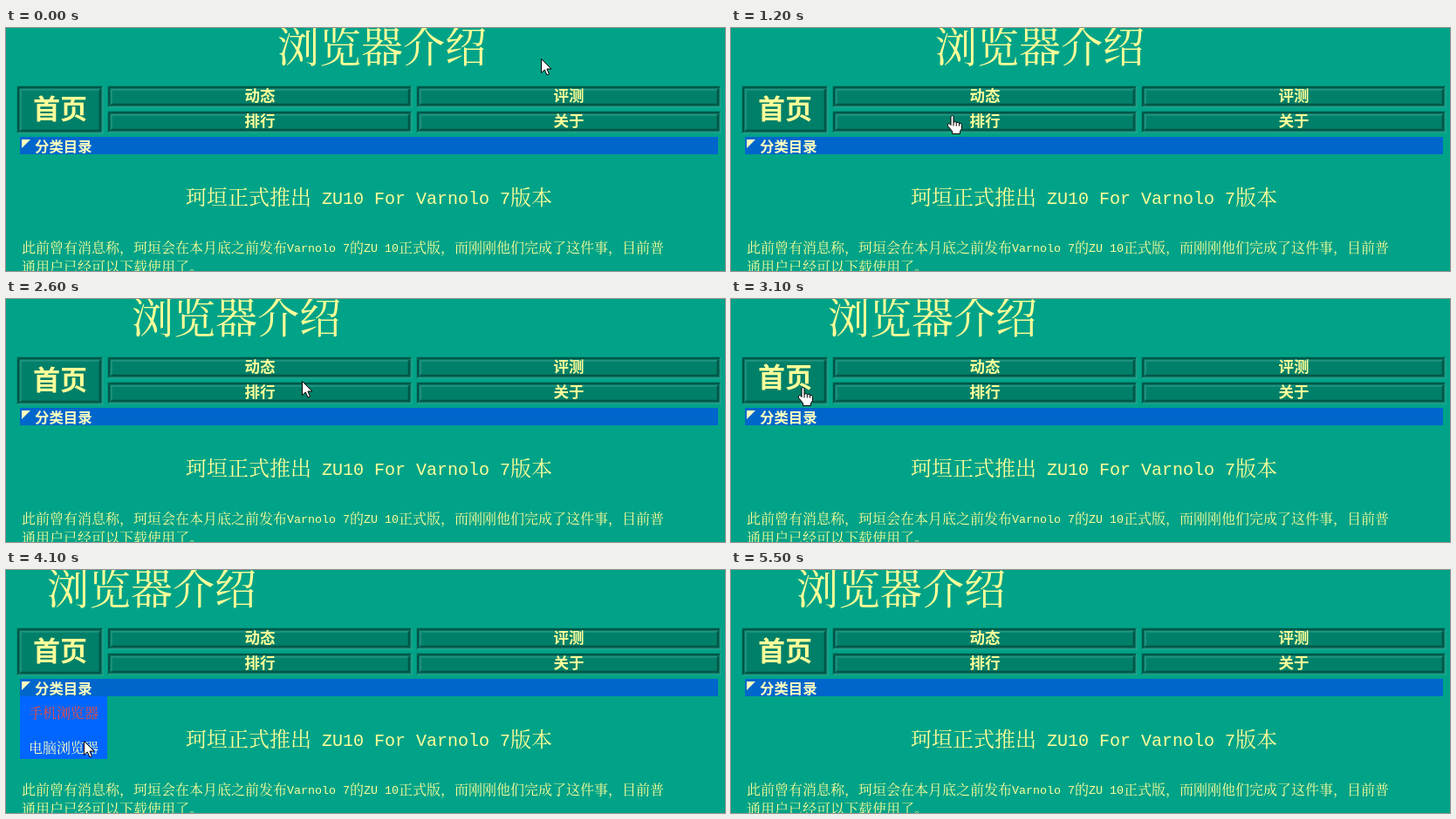
An HTML page with a canvas for the animation above (5600 ms loop, 824x279 px).

```html
<!DOCTYPE html>
<html lang="zh">
<head>
<meta charset="utf-8">
<title>浏览器介绍</title>
<style>
html, body { margin: 0; width: 100%; height: 100%; overflow: hidden; background: #00a388; }
canvas { display: block; }
</style>
</head>
<body>
<canvas id="stage" width="824" height="279"></canvas>
<script>
const ctx = document.getElementById('stage').getContext('2d');
const LOOP = 5600, STEP = 100;
const YELLOW = '#ffff99', PALE = '#ffffc0';
const SANS = '"Noto Sans CJK SC", "Noto Sans CJK", sans-serif';
const SERIF = '"Noto Serif CJK SC", "Noto Sans CJK SC", "Noto Sans CJK", serif';
const MONO = '"Liberation Mono", monospace';

const home = { x: 13, y: 67, w: 98, h: 54, label: '首页', size: 31, lift: 3 };
const links = ['动态', '评测', '排行', '关于'].map((label, i) => ({
  x: 117 + 354 * (i % 2), y: 67 + 29 * Math.floor(i / 2),
  w: 348, h: 24, label, size: 17.5, lift: 0
}));
const buttons = [home, ...links];

// Places the pointer visits: step, x, y
const stops = [
  [0, 613, 35], [6, 228, 60], [12, 253, 100], [18, 592, 107], [21, 595, 86], [31, 82, 101],
  [36, 70, 165], [41, 89, 196], [47, 338, 216], [48, 595, 214], [51, 800, -40]
];

const arrow = new Path2D('M0 0V16L3.8 12.4L6.5 18.5L9 17.4L6.4 11.5H11.5Z');
const hand = new Path2D('M-1.5 1Q0 -1 1.5 1V8Q3.5 6 5 8Q7 7 8 9Q10.5 8 11 11V15L9 18V21H0V18L-5 12Q-6 9 -3.5 9L-1.5 11Z');

function text(str, x, midY, size, color, family = SERIF, weight = 300) {
  ctx.font = `${weight} ${size}px ${family}`;
  ctx.fillStyle = color;
  ctx.fillText(str, x, midY + size * 0.38);
}

// Latin runs take half the advance of a full-width character
function mixed(str, x, midY, size) {
  for (const run of str.match(/[ -~]+|[^ -~]+/g)) {
    if (run.charCodeAt(0) < 128) text(run, x, midY, size / 1.2, YELLOW, MONO, 400);
    else text(run, x, midY, size, YELLOW);
    x += ctx.measureText(run).width;
  }
}

function rect(x, y, w, h, color) {
  ctx.fillStyle = color;
  ctx.fillRect(x, y, w, h);
}

// One pixel-wide corner: the top and left sides, or the bottom and right ones
function corner({ x, y, w, h }, inset, topLeft, color) {
  const l = x + inset + 0.5, t = y + inset + 0.5;
  const r = x + w - inset - 0.5, b = y + h - inset - 0.5;
  ctx.strokeStyle = color;
  ctx.lineWidth = 1;
  ctx.lineJoin = 'round';
  ctx.beginPath();
  ctx.moveTo(l, b);
  if (topLeft) ctx.lineTo(l, t);
  else ctx.lineTo(r, b);
  ctx.lineTo(r, t);
  ctx.stroke();
}

const bell = (v, mid, spread) => Math.exp(-(((v - mid) / spread) ** 2));

function drawButton(b, hover) {
  ctx.fillStyle = '#008069';
  ctx.beginPath();
  ctx.roundRect(b.x, b.y, b.w, b.h, 3);
  ctx.fill();
  // A soft groove, lit along its lower right sides
  for (let i = -1; i <= 5; i++) {
    for (const topLeft of [true, false]) {
      const dark = bell(i, topLeft ? 0.5 : 2.5, 1.3) * 0.55;
      const light = bell(i, topLeft ? 3.3 : 0, 1) * 0.25;
      corner(b, i, topLeft, `rgba(0, 40, 34, ${dark})`);
      corner(b, i, topLeft, `rgba(150, 215, 205, ${light})`);
    }
  }
  text(b.label, b.x + b.w / 2 - b.size, b.y + b.h / 2 - 1.5 - (hover ? b.lift : 0),
    b.size, YELLOW, SANS, 700);
}

function pointerAt(n) {
  const i = stops.findIndex(s => s[0] > n);
  if (i < 0) return null;
  const [n0, x0, y0] = stops[i - 1], [n1, x1, y1] = stops[i];
  const k = (n - n0) / (n1 - n0);
  return { x: Math.round(x0 + (x1 - x0) * k), y: Math.round(y0 + (y1 - y0) * k) };
}

const inside = (p, b) => p.x >= b.x && p.x < b.x + b.w && p.y >= b.y && p.y < b.y + b.h;

function drawPointer({ x, y }, shape) {
  ctx.save();
  ctx.translate(x + 0.5, y + 0.5);
  ctx.fillStyle = '#fff';
  ctx.strokeStyle = '#000';
  ctx.lineWidth = 1;
  ctx.lineJoin = 'round';
  ctx.fill(shape);
  ctx.stroke(shape);
  if (shape === hand) {
    for (let fx = 1.5; fx < 9; fx += 3.25) rect(fx - 0.5, 8, 1, 4, '#000');
  }
  ctx.restore();
}

function drawMenu(n) {
  rect(16, 145, 100, 72, '#0066ff');
  text('手机浏览器', 26, 164, 16, n >= 36 ? '#f04a3c' : PALE);
  text('电脑浏览器', 26, 204, 16, PALE);
}

function drawBar() {
  rect(16, 125, 800, 20, '#0066cc');
  ctx.fillStyle = PALE;
  ctx.beginPath();
  ctx.moveTo(18, 128);
  ctx.lineTo(28, 128);
  ctx.lineTo(18, 138);
  ctx.fill();
  text('分类目录', 33, 136, 16.4, PALE, SANS, 700);
}

function draw(n) {
  const pointer = pointerAt(n);
  const over = pointer && buttons.find(b => inside(pointer, b));

  rect(0, 0, 824, 279, '#00a388');
  // The title slides left, bounces at the edge and returns
  text('浏览器介绍', Math.round(16 + 6.45 * Math.abs(n - 45.8)), 21, 48, YELLOW);

  for (const b of buttons) drawButton(b, b === over);
  drawBar();

  mixed('珂垣正式推出 ZU10 For Varnolo 7版本', 206, 194, 24);
  mixed('此前曾有消息称，珂垣会在本月底之前发布Varnolo 7的ZU 10正式版，而刚刚他们完成了这件事，目前普', 18, 252, 16);
  mixed('通用户已经可以下载使用了。', 18, 274, 16);

  if (n >= 33 && n <= 42) drawMenu(n);
  if (pointer) drawPointer(pointer, over ? hand : arrow);
}

function tick() {
  draw(Math.floor(performance.now() % LOOP / STEP));
  requestAnimationFrame(tick);
}
tick();
</script>
</body>
</html>
```
